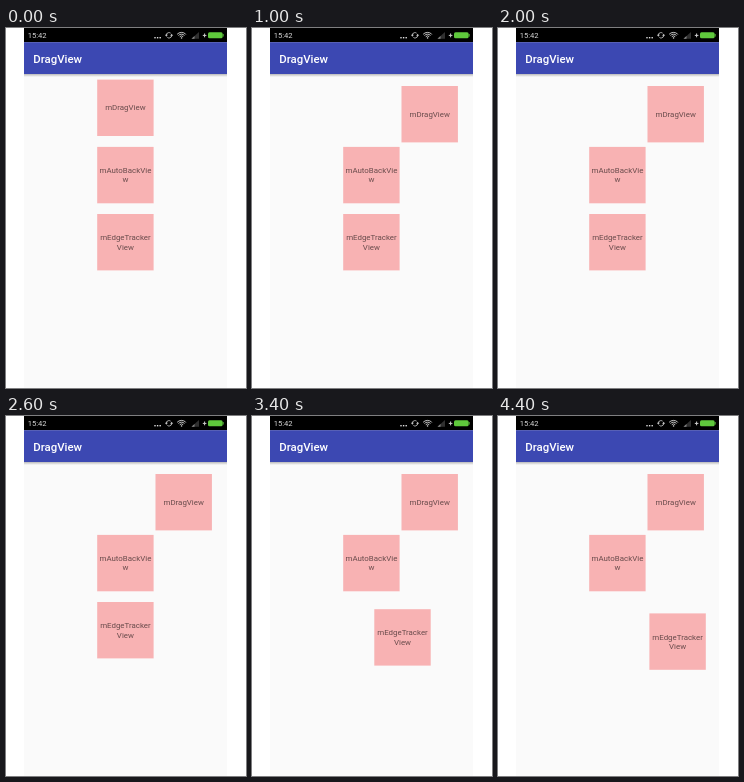
An HTML page with a canvas that plays this animation: 240 px wide and 360 px high, repeating every 4.8 s.

```html
<!DOCTYPE html>
<html lang="en">
<head>
<meta charset="utf-8">
<title>DragView</title>
<style>
html, body { margin: 0; width: 100%; height: 100%; overflow: hidden; background: #fff; }
canvas { display: block; width: 100%; height: 100%; }
</style>
</head>
<body>
<canvas id="stage"></canvas>
<script>
const W = 240, H = 360, LOOP = 4800, SIZE = 56.4;
const canvas = document.getElementById('stage');
const ctx = canvas.getContext('2d');
const ratio = window.devicePixelRatio || 1;
canvas.width = W * ratio;
canvas.height = H * ratio;
ctx.scale(ratio, ratio);

// Each stop is [time, x, y]; a view holds its place until the next stop.
const views = [
  { lines: ['mDragView'], stops: [[0, 91.2, 51.6], [600, 105, 54], [800, 119.6, 56], [1000, 149.5, 58]] },
  { lines: ['mAutoBackVie', 'w'], stops: [[0, 91.2, 118.9], [1600, 112, 178.9], [1800, 117.5, 195.5], [2000, 91.2, 118.9]] },
  { lines: ['mEdgeTracker', 'View'], stops: [[0, 91.2, 186], [3200, 101.6, 188.6], [3400, 122.3, 193.2], [3600, 137.5, 195.6], [3800, 151.4, 197.4]] }
];

function rect(x, y, w, h, fill) {
  ctx.fillStyle = fill;
  ctx.fillRect(x, y, w, h);
}

function text(str, x, y, font, fill, align = 'left') {
  ctx.font = font + ' Roboto, sans-serif';
  ctx.fillStyle = fill;
  ctx.textAlign = align;
  ctx.fillText(str, x, y);
}

function arc(x, y, r, from, to) {
  ctx.beginPath();
  ctx.arc(x, y, r, from * Math.PI, to * Math.PI);
  ctx.stroke();
}

function poly(points, fill) {
  ctx.beginPath();
  points.forEach(([x, y]) => ctx.lineTo(x, y));
  ctx.fillStyle = fill;
  ctx.fill();
}

function drawStatus() {
  rect(18, 0, 203, 14.2, '#000');
  text('15:42', 21.7, 10.3, '7.6px', '#d8d8d8');
  for (let i = 0; i < 3; i++) rect(148.3 + i * 2.6, 9, 1.4, 1.4, '#ddd');

  // sync arrows
  ctx.strokeStyle = '#c4c4c4';
  ctx.lineWidth = 0.9;
  arc(163, 7.3, 2.7, 0.95, 1.7);
  arc(163, 7.3, 2.7, -0.05, 0.7);
  poly([[158.9, 6.8], [161.9, 6.8], [160.4, 8.8]], '#c4c4c4');
  poly([[164.1, 7.8], [167.1, 7.8], [165.6, 5.8]], '#c4c4c4');

  // wifi
  ctx.strokeStyle = '#d6d6d6';
  for (const r of [2.4, 4.2, 6]) arc(175.5, 10.4, r, 1.24, 1.76);
  rect(174.9, 9.3, 1.3, 1.3, '#d6d6d6');

  // signal
  poly([[185.5, 10.8], [193, 10.8], [193, 4]], '#303030');
  poly([[185.5, 10.8], [188.5, 10.8], [188.5, 8.1]], '#888');

  // charging mark and battery
  rect(196.8, 6.9, 3.6, 1, '#ccc');
  rect(198.1, 5.5, 1, 3.8, '#ccc');
  ctx.beginPath();
  ctx.roundRect(202, 4.3, 14.6, 6, 1.5);
  ctx.fillStyle = '#5fc83c';
  ctx.fill();
  rect(216.6, 6, 1, 2.6, '#5fc83c');
}

function drawBar() {
  rect(18, 14.2, 203, 31.8, '#3c48b2');
  const shade = ctx.createLinearGradient(0, 46, 0, 49);
  shade.addColorStop(0, 'rgba(0,0,0,0.26)');
  shade.addColorStop(1, 'rgba(0,0,0,0)');
  rect(18, 46, 203, 3, shade);
  text('DragView', 27.3, 34.6, '500 11.4px', '#fff');
}

function drawView({ lines, stops }, t) {
  const [, x, y] = stops.filter(s => s[0] <= t).pop();
  rect(x, y, SIZE, SIZE, 'rgba(240,10,14,0.3)');
  const step = 9.26;
  const top = y + SIZE / 2 - lines.length * step / 2;
  lines.forEach((line, i) =>
    text(line, x + SIZE / 2, top + i * step + 7.3, '7.9px', 'rgba(0,0,0,0.58)', 'center'));
}

function frame() {
  const t = performance.now() % LOOP;
  rect(0, 0, W, H, '#fff');
  rect(18, 0, 203, H, '#fafafa');
  drawStatus();
  drawBar();
  views.forEach(view => drawView(view, t));
  requestAnimationFrame(frame);
}
frame();
</script>
</body>
</html>
```
